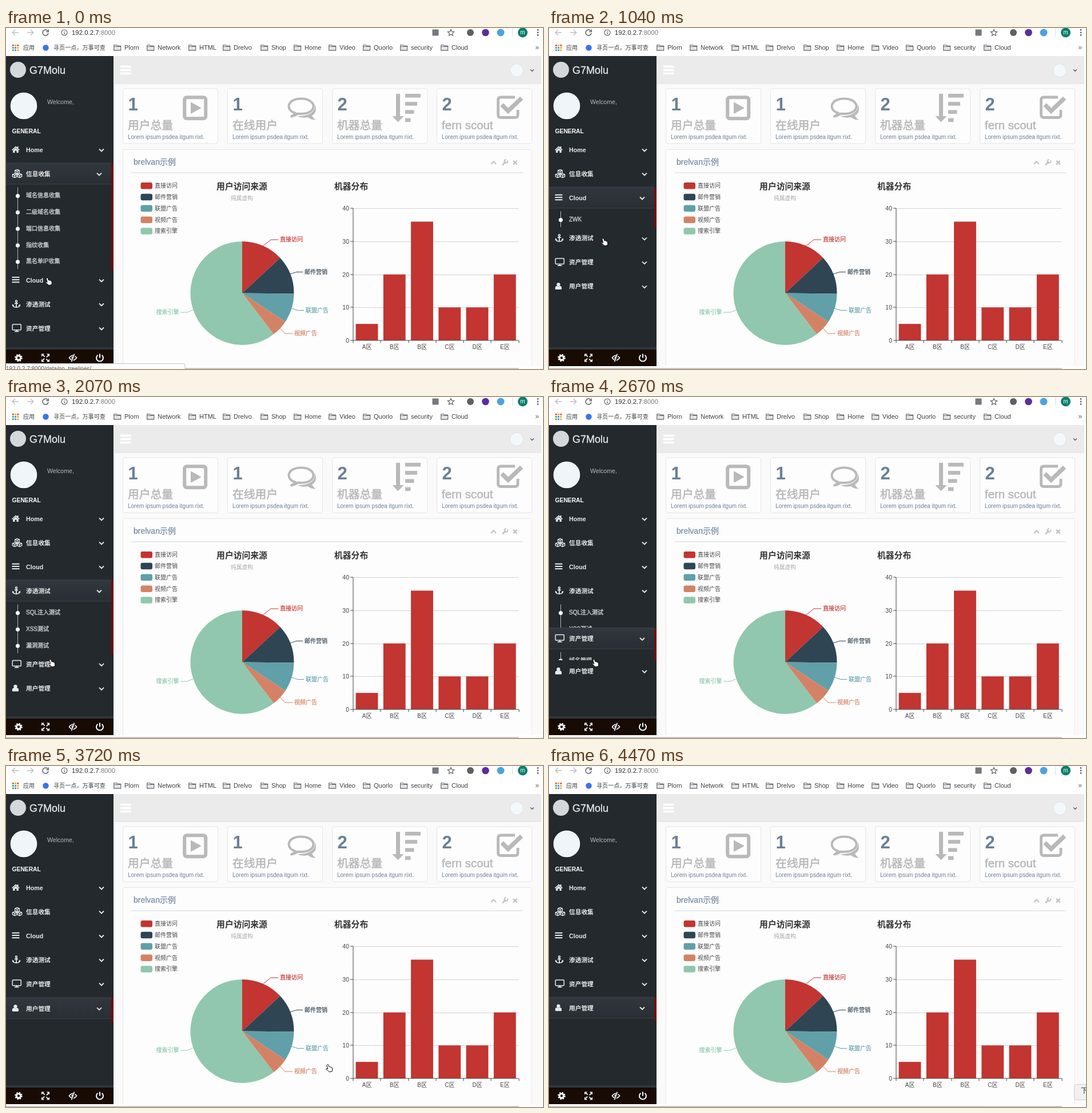
An HTML page for the animation above (4.91 s loop, 939x596 px).

```html
<!DOCTYPE html>
<html lang="zh">
<head>
<meta charset="utf-8">
<title>Dashboard</title>
<style>
html, body { margin: 0; width: 100%; height: 100%; overflow: hidden; background: #fff; }
body > svg { display: block; width: 100%; height: 100%; }
text { font-family: "Liberation Sans", "Noto Sans CJK SC", "Noto Sans CJK", sans-serif; white-space: pre; }
</style>
</head>
<body>
<svg id="stage" viewBox="0 0 939 596"></svg>
<script>
const LOOP = 4910, SLIDE = 400, ROW = 28.8, PITCH = 42, SIDE = 188;

// Text is placed by its vertical centre.
const text = (x, cy, str, size, fill, more = '') =>
  `<text x="${x}" y="${cy + size * .36}" font-size="${size}" fill="${fill}" ${more}>${str}</text>`;
const rect = (x, y, w, h, fill, more = '') =>
  `<rect x="${x}" y="${y}" width="${w}" height="${h}" fill="${fill}" ${more}/>`;
const circle = (x, y, r, fill, more = '') =>
  `<circle cx="${x}" cy="${y}" r="${r}" fill="${fill}" ${more}/>`;
const fillPath = (d, fill, more = '') => `<path d="${d}" fill="${fill}" ${more}/>`;
const line = (d, color, width = 1, more = '') =>
  `<path d="${d}" fill="none" stroke="${color}" stroke-width="${width}" ${more}/>`;
const at = (x, y, body) => `<g transform="translate(${x} ${y})">${body}</g>`;
const outline = (color, width) => `stroke="${color}" stroke-width="${width}" `;
const BOLD = 'font-weight="700" ', MIDDLE = 'text-anchor="middle" ', END = 'text-anchor="end" ';

function browserBar() {
  const ink = '#5f6368', pale = '#bcbfc2';
  const folders = [[188, 'Plorn'], [246, 'Network'], [319, 'HTML'], [379, 'Drelvo'], [445, 'Shop'],
    [503, 'Home'], [564, 'Video'], [624, 'Quorlo'], [689, 'security'], [760, 'Cloud']];
  const dots = ['#e8453c', '#f2a60c', '#e8453c', '#3aa757', '#4285f4', '#f2a60c', '#3aa757', '#4285f4', '#f2a60c'];
  return rect(0, 0, 939, 49, '#fff') +
    line('M22 8H11.5M16 3.2L11.2 8 16 12.8', pale, 1.4) +
    line('M37 8H47.5M43 3.2L47.8 8 43 12.8', pale, 1.4) +
    line('M73 5A5 5 0 1 0 74 9M74.3 2.5V6.4H70.2', ink, 1.5) +
    circle(102, 8, 5, 'none', outline(ink, 1.2)) + line('M102 7.5V11M102 5V6.2', ink, 1.3) +
    text(115, 8.2, `192.0.2.7<tspan fill="#777b7f">:8000</tspan>`, 11.4, '#2b2d30') +
    rect(745.5, 2.5, 11, 11, '#75797d', 'rx="1"') +
    line('M778 2.6l1.6 3.6 4 .4-3 2.7.9 3.9-3.5-2-3.5 2 .9-3.9-3-2.7 4-.4z', ink, 1.2) +
    circle(812, 8, 6, '#5d6064') + circle(838.5, 8, 6.3, '#5a2d9c') + circle(865, 8, 6.5, '#4ba3dd') +
    line('M885.5 1V15', '#ddd') +
    circle(903.5, 8, 8.5, '#0b7f6b') + text(903.5, 7.6, 'm', 10, '#fff', MIDDLE) +
    [3.5, 8, 12.5].map(y => circle(930, y, 1.4, ink)).join('') +
    dots.map((c, i) => rect(11 + i % 3 * 4.2, 29 + (i / 3 | 0) * 4.2, 2.8, 2.8, c)).join('') +
    text(30, 34.5, '应用', 10.1, '#3c4043') +
    circle(69.5, 34.5, 5.2, '#3a73e8') +
    text(83, 34.5, '寻页一点，万事可查', 10.1, '#3c4043') +
    folders.map(([x, name]) =>
      rect(x + .7, 32.2, 12.2, 6.9, '#e4e5e7') +
      line(`M${x + .7} 29.7h4.5l1.5 1.6h6v7.8h-12zM${x + .7} 32.2h12`, ink, 1.1) +
      text(x + 19, 34.2, name, 11, '#3c4043')).join('') +
    text(925.5, 33.5, '»', 12, ink);
}

function cardIcons(c) {
  return rect(312.2, 121.2, 37, 37, 'none', 'rx="4" ' + outline(c, 6)) +
    fillPath('M323 130.5v18.5q0 1 1 .6l16.5-9q1-.8 0-1.6l-16.5-9q-1-.5-1 .5z', c) +
    line('M506 149Q494 145 494.5 136C496 127 506 123.5 516 123.5C528 123.5 537.5 129 537.5 137S528 150 516 150L510 149.7Q505 153.5 499 154.5Q504 152 506 149Z', c, 4, 'stroke-linejoin="round"') +
    fillPath('M539 132Q543.5 139 541 147Q539 151 535 153Q537 158 542 160.5Q534 161 528 156Q517 158 509 154Q533 154.5 539 142Q541 137 539 132Z', c) +
    fillPath('M682 115h7v39h6.5l-10 10.5-10-10.5h6.5z', c) +
    [27, 21, 15.5, 9.5].map((w, i) => rect(698, 115 + i * 14.2, w, 6.6, c)).join('') +
    line('M895 143v8.5q0 5-5 5h-24.5q-5 0-5-5v-25.5q0-5 5-5h24.5', c, 4.8) +
    line('M867 134l11 11 23.5-22.5', c, 7.5);
}

function cards() {
  const slate = '#6c8096', grey = '#b9b9b9';
  return [[1, '用户总量'], [1, '在线用户'], [2, '机器总量'], [2, 'fern scout']].map(([n, label], i) => {
    const x = 204.5 + i * 183;
    return rect(x, 106, 166, 96, '#fdfdfd', 'rx="3" stroke="#e5e5e5"') +
      text(x + 9, 133, n, 31, slate, BOLD) +
      text(x + 8.5, 169.5, label, i < 3 ? 19.8 : 20.4, grey, outline(grey, .6)) +
      text(x + 8.5, 190, 'Lorem ipsum psdea itgum rixt.', 10, slate);
  }).join('') + cardIcons(grey);
}

function pie() {
  const cx = 413, cy = 463.5, r = 90.5;
  const slices = [
    ['直接访问', 335, '#c23531', 'M450 380.5L463 370H476', 479, 370],
    ['邮件营销', 310, '#2f4554', 'M497 430L508 426.5H519', 522, 426.5],
    ['联盟广告', 234, '#61a0a8', 'M499 490L510 493.5H521', 524, 493.5],
    ['视频广告', 135, '#d48265', 'M479 525L488 534H501', 504, 534],
    ['搜索引擎', 1548, '#91c7ae', 'M327.5 492.5L317 497H305', 262.5, 497]];
  const total = slices.reduce((sum, s) => sum + s[1], 0);
  const rim = v => `${cx + r * Math.sin(v / total * 2 * Math.PI)} ${cy - r * Math.cos(v / total * 2 * Math.PI)}`;
  let sum = 0;
  return slices.map(([name, value, color, lead, x, y], i) => {
    const from = sum, row = 275.5 + i * 19.8;
    sum += value;
    return fillPath(`M${cx} ${cy}L${rim(from)}A${r} ${r} 0 ${+(value > total / 2)} 1 ${rim(sum)}Z`, color) +
      line(lead, color) + text(x, y - .5, name, 10, color, outline(color, .2)) +
      rect(235.5, row - 5.5, 20.5, 11.5, color, 'rx="3"') + text(260, row, name, 10, '#444');
  }).join('');
}

function bars() {
  const x0 = 607, x1 = 896.5, y0 = 546, unit = 5.765, step = (x1 - x0) / 6, ink = '#444';
  let out = '';
  for (let v = 0; v <= 40; v += 10) {
    const y = Math.round(y0 - v * unit);
    if (v) out += line(`M${x0} ${y + .5}H${x1}`, '#d3d3d3');
    out += line(`M${x0 - 5} ${y}h5`, ink) + text(x0 - 7, y, v, 10.5, ink, END);
  }
  [5, 20, 36, 10, 10, 20].forEach((v, i) => {
    const x = x0 + i * step;
    out += rect(x + 4.6, y0 - v * unit, 38.8, v * unit, '#c23531') +
      text(x + step / 2, 557, 'ABBCDE'[i] + '区', 10, ink, MIDDLE);
  });
  for (let i = 0; i <= 6; i++) out += line(`M${Math.round(x0 + i * step)} ${y0}v4.5`, ink);
  return out + line(`M${x0} 315V${y0}H${x1}`, ink);
}

function page() {
  const tool = '#c3c6ca';
  return rect(SIDE, 49, 748, 542, '#fafafa') + rect(SIDE, 49, 748, 48, '#ebebeb') +
    line(`M${SIDE} 97H936`, '#d9dee4') +
    line('M200 67.5H218.5M200 73.5H218.5M200 79.5H218.5', '#fff', 3.4) +
    circle(893, 74, 11.5, '#f3f8fa', outline('#d8dcde', .8)) +
    line('M917 72.5l3 3 3-3', '#555', 1.3) +
    cards() +
    line('M204.5 591V215q0-2.5 2.5-2.5H916.5q2.5 0 2.5 2.5V591', '#e5e6e8') +
    rect(205, 213, 713.5, 378, '#fdfdfd') +
    text(223, 234, 'brelvan示例', 14, '#73879c', outline('#73879c', .2)) +
    line('M219 253H904', '#e0e3e7', 1.5) +
    line('M848 238l4.5-4.5 4.5 4.5', tool, 2.4) +
    line('M868 239.5l6-6', tool, 2.8) + line('M877 231.5a3 3 0 1 1-2.5-1.5', tool, 2) +
    line('M887 232l6.5 6.5m0-6.5l-6.5 6.5', tool, 2.6) +
    text(412.5, 277, '用户访问来源', 14.8, '#333', BOLD + MIDDLE) +
    text(412.5, 297.5, '纯属虚构', 9.8, '#aaa', MIDDLE) +
    text(574, 277, '机器分布', 14.8, '#333', BOLD) +
    pie() + bars() +
    rect(-4, 594.2, 901, 3, '#c4c4c4', 'rx="1.5"');
}

const WHITE = '#e9ebec';
const ICONS = {
  home: fillPath('M-7 .5L0-6l2.5 2.2V-5.5h2v3.5L7 .5l-1 1-6-5-6 5zM-4.8 1.3L0-2.7l4.8 4V5.5h-3.3V2h-3v3.5h-3.3z', WHITE),
  cubes: [[0, -3.6], [-4.3, 3.4], [4.3, 3.4]].map(([x, y]) =>
    at(x, y, line('M0-3.5l3.8 1.5v4L0 3.7-3.8 2v-4zM-3.8-2L0-.4 3.8-2M0-.4V3.7', WHITE, 1.3))).join(''),
  bars: line('M-6.5-4.7h13M-6.5-.5h13M-6.5 3.7h13', WHITE, 2.1),
  anchor: circle(0, -5, 1.6, 'none', outline(WHITE, 1.5)) +
    line('M0-3.5V6M-3-1.2h6M-6.2 1.5C-5.5 7 5.5 7 6.2 1.5', WHITE, 1.8) +
    fillPath('M-7 4v-4l3.5 2.5zM7 4v-4l-3.5 2.5z', WHITE),
  desktop: rect(-7.2, -6.5, 15, 9.8, 'none', 'rx="1" ' + outline(WHITE, 1.5)) +
    line('M-3.5 5.8h7.5M.3 3v3', WHITE, 1.8),
  user: circle(0, -3, 3.1, WHITE) +
    fillPath('M-5.7 4.5C-5.7 1-5-.4-2.5-.6q2.5 1.6 5 0C5-.4 5.7 1 5.7 4.5q0 1.2-1.5 1.2h-8.4q-1.5 0-1.5-1.2z', WHITE),
};

const MENU = [
  ['home', 17, 'Home', []],
  ['cubes', 19.5, '信息收集', ['域名信息收集', '二级域名收集', '端口信息收集', '指纹收集', '黑名单IP收集']],
  ['bars', 17, 'Cloud', ['ZWK']],
  ['anchor', 18, '渗透测试', ['SQL注入测试', 'XSS测试', '漏洞测试']],
  ['desktop', 18.5, '资产管理', ['域名管理']],
  ['user', 16.5, '用户管理', []],
];

const menuItem = ([icon, x, label, children]) => `<g class="item">
  <g class="glow">${rect(0, -18, 184, 36, 'url(#glow)')}${line('M0-18.5H184M0 18.3H184', '#444a50', .8)}</g>
  <rect class="bar" x="184" y="-18" width="4" fill="#720808"/>
  ${at(x, 0, ICONS[icon])}
  ${text(35, .3, label, 10.7, WHITE, BOLD)}
  <path class="chevron" d="M-4-1l4 4 4-4" fill="none" ${outline(WHITE, 1.8)}/>
  <svg class="sub" y="23" width="184" height="0" overflow="hidden">
    ${line(`M20.5 1V${children.length * ROW}`, '#b4b8bb')}
    ${children.map((name, i) => circle(20.5, 16 + i * ROW, 3.5, '#fff') +
      text(35, 15 + i * ROW, name, 10, '#cdd0d2', outline('#cdd0d2', .35))).join('')}
  </svg></g>`;

function footer() {
  const w = '#fff', back = '#170b04';
  const arrow = fillPath('M-7-7h5l-1.6 1.6 3 3-1.2 1.2-3-3L-7-2z', w);
  return rect(0, 558, SIDE, 4, '#30363a') + rect(0, 562, SIDE, 29, back) +
    at(22, 576.5, circle(0, 0, 3.7, 'none', outline(w, 3)) +
      circle(0, 0, 5.6, 'none', outline(w, 2.4) + 'stroke-dasharray="2.2 2.198"')) +
    at(69, 576.5, [0, 90, 180, 270].map(a => `<g transform="rotate(${a})">${arrow}</g>`).join('')) +
    at(117, 576.5, line('M-6.5 0Q0-8.5 6.5 0Q0 8.5-6.5 0z', w, 1.6) + circle(0, 0, 2.5, w) +
      line('M3.5-7L-2 7', back, 3) + line('M2.5-7L-2.5 7', w, 1.5)) +
    at(164, 576.5, line('M-3.5-4.8A6 6 0 1 0 3.5-4.8M0-7V0', w, 2));
}

const sidebar = () => rect(0, 49, SIDE, 542, '#23292d') +
  circle(21, 73, 14, '#d5d8da') +
  text(41, 73.5, 'G7Molu', 18, '#eceef0', outline('#eceef0', .3)) +
  circle(31, 136, 22.5, '#eff5f8', outline('#fff', 1.5)) +
  text(72, 129, 'Welcome,', 10.6, '#b4babf') +
  text(10.5, 180, 'GENERAL', 10.3, '#fff', BOLD) +
  MENU.map(menuItem).join('') + footer();

const stage = document.getElementById('stage');
stage.innerHTML = `<defs><linearGradient id="glow" x2="0" y2="1">
    <stop stop-color="#31373e"/><stop offset="1" stop-color="#292e33"/></linearGradient></defs>` +
  browserBar() + page() + sidebar() +
  `<g id="status">${rect(-3, 586.5, 316, 14, '#fcfcfc', 'rx="3" stroke="#c4c4c4"')}
    ${text(0, 595.5, '192.0.2.7:8000/data/no_treelines/', 10, '#5a5a5a')}</g>
  <g id="tip">${rect(918.5, 556.5, 40, 27, '#f1f1f1', 'rx="3" stroke="#cfcfcf"')}${text(930, 568, '下一页', 12, '#333')}</g>
  <path id="hand" fill="#fff" stroke="#000" stroke-linejoin="round" d="M3.2.8c.8-.3 1.6.1 1.8.9l.9 3 .6-.1c.7-.2 1.3.1 1.6.6.7-.2 1.4 0 1.7.6.8-.1 1.4.3 1.6 1.1l.3 2.3c.3 1.3-.2 2.5-.4 3.5l-5 1c-1-1.3-2.6-2-3.7-3.3L.8 8.9c-.6-.7.3-1.7 1.3-1.2l1.6.8L2 2.4C1.8 1.6 2.4 1 3.2.8z"/>`;

// Screen refreshes: time and pointer position.
const STEPS = [
  [0, 68.5, 436], [150, 68.5, 436], [300, 69, 436], [450, 69, 435], [590, 73, 422], [740, 80, 400],
  [890, 88, 376], [1040, 91, 367], [1340, 91, 367], [1490, 90, 370], [1640, 87, 392], [1790, 81, 428],
  [1930, 75, 452], [2070, 74, 458], [2520, 74, 458], [2670, 75, 458], [2820, 80, 457], [2970, 83, 456],
  [3420, 84, 456], [3570, 250, 490], [3720, 559, 521], [3870, 720, 544], [4020, 830, 562],
  [4170, 905, 578], [4320, 945, 600], [4470, 945, 600]];
// Moment each menu entry is opened; the next one closes it.
const OPENED = [-Infinity, -Infinity, 406, 1290, 2465, 3364, Infinity];

const swing = p => .5 - Math.cos(Math.PI * Math.min(1, Math.max(0, p))) / 2;
const items = [...document.querySelectorAll('.item')].map(el => ({
  el, glow: el.querySelector('.glow'), bar: el.querySelector('.bar'),
  chevron: el.querySelector('.chevron'), sub: el.querySelector('.sub')
}));
const [statusBox, tip, hand] = ['status', 'tip', 'hand'].map(id => document.getElementById(id));
const show = (el, on) => el.setAttribute('visibility', on ? 'visible' : 'hidden');
const move = (el, x, y) => el.setAttribute('transform', `translate(${x} ${y})`);

function draw(now) {
  const [t, x, y] = STEPS.findLast(step => step[0] <= now);
  let top = 212.5;
  items.forEach((item, i) => {
    const active = t >= OPENED[i] && t < OPENED[i + 1];
    const open = swing((t - OPENED[i]) / SLIDE) - swing((t - OPENED[i + 1]) / SLIDE);
    const height = MENU[i][3].length * ROW * open;
    move(item.el, 0, top);
    show(item.glow, active);
    show(item.bar, active);
    item.bar.setAttribute('height', PITCH + height);
    item.sub.setAttribute('height', height);
    move(item.chevron, active ? 163 : 167, 0);
    top += PITCH + height;
  });
  move(hand, x, y);
  show(statusBox, t < 300);
  show(tip, t >= 4470);
}

const start = performance.now();
function tick() {
  draw((performance.now() - start) % LOOP);
  requestAnimationFrame(tick);
}
tick();
</script>
</body>
</html>
```
